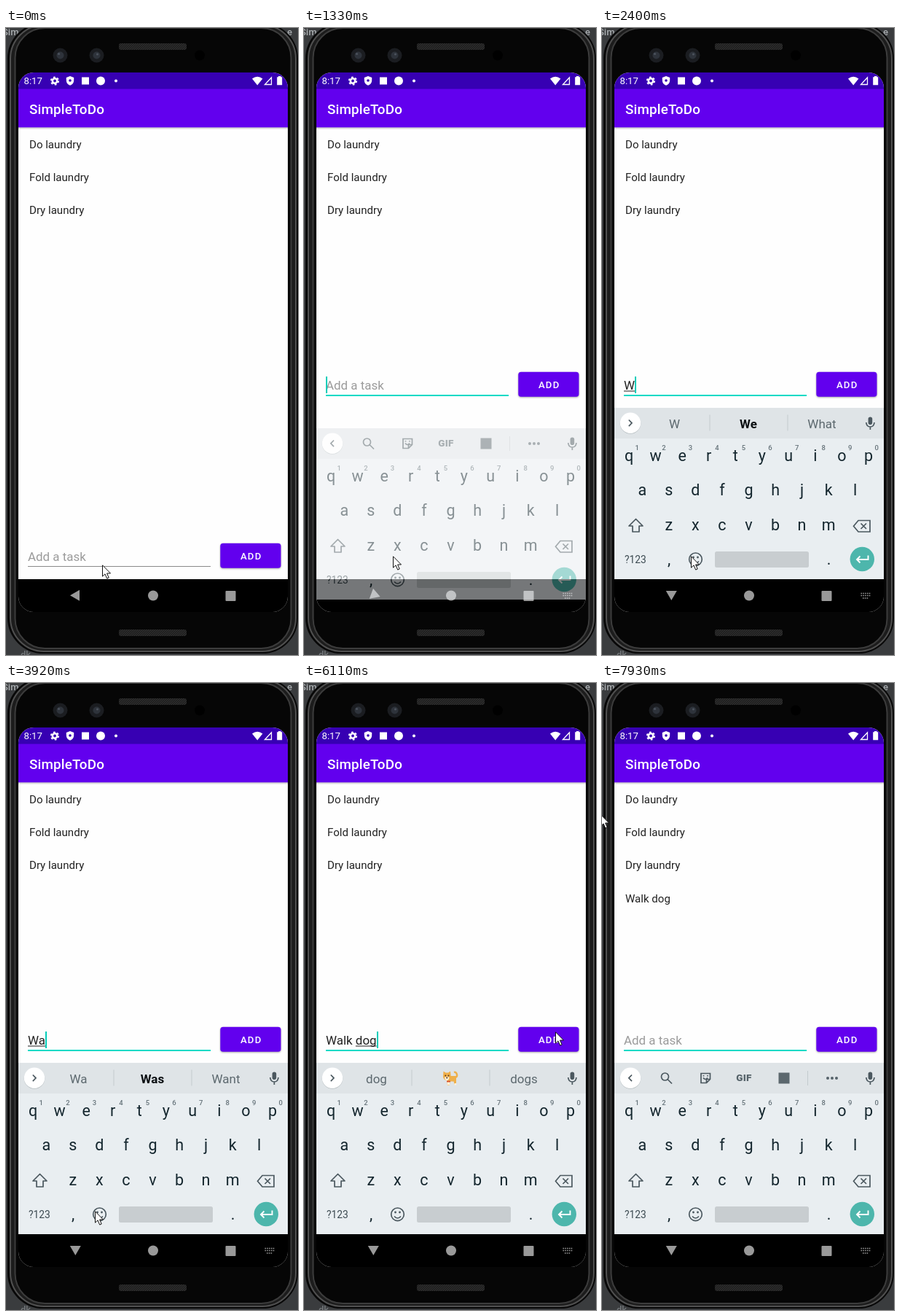
An HTML page for the animation above (8000 ms loop, 401 px wide and 860 px high).

```html
<!DOCTYPE html>
<html lang="en">
<head>
<meta charset="utf-8">
<title>To-do app demo</title>
<style>
html, body { margin: 0; width: 100%; height: 100%; overflow: hidden; background: #3a3c3e; }
svg { display: block; font-family: Roboto, "Open Sans", sans-serif; }
text { white-space: pre; }
.mid { text-anchor: middle; }
.item { font-size: 15.07px; fill: #212121; }
.field { font-size: 16.96px; }
.key { font-size: 21.5px; fill: #14262e; }
.num { font-size: 9.5px; font-weight: 500; fill: #66737a; }
.sug { font-size: 17px; fill: #5c686e; }
.best { font-weight: 700; fill: #0b0f12; }
.line { fill: none; stroke: #4b585f; stroke-width: 1.7; }
#btn { filter: drop-shadow(0 1px 1px rgba(0, 0, 0, .35)); }
</style>
</head>
<body>
<svg width="401" height="860" viewBox="0 0 401 860">
  <defs>
    <pattern id="mesh" width="3" height="3" patternUnits="userSpaceOnUse">
      <rect width="3" height="3" fill="#2c2c2c"/><path d="M0 3L3 0" stroke="#181818"/>
    </pattern>
    <linearGradient id="shade" x2="0" y2="1">
      <stop stop-color="#000" stop-opacity=".25"/><stop offset="1" stop-color="#000" stop-opacity="0"/>
    </linearGradient>
    <clipPath id="screen"><rect x="17" y="61" width="370" height="740" rx="21"/></clipPath>
  </defs>

  <!-- desktop and phone body -->
  <rect width="401" height="860" fill="#3a3c3e"/>
  <g font-size="13" font-weight="500" fill="#a9adb0">
    <text x="-5" y="10">Sim</text><text x="386" y="10">e</text>
    <text x="20" y="864" fill="#73777a">dk.</text>
  </g>
  <rect x="3" y="-6" width="397" height="863" rx="48" fill="#0b0b0b" stroke="#080808" stroke-width="2"/>
  <rect x="6" y="-4" width="392" height="859" rx="46" fill="#1c1c1c" stroke="#505050" stroke-width="2"/>
  <rect x="12.5" y="0" width="379" height="851" rx="41" fill="#060606" stroke="#3c3c3c" stroke-width="2"/>
  <g fill="url(#mesh)">
    <rect x="155" y="21" width="93" height="9" rx="3"/><rect x="155" y="825" width="93" height="9" rx="3"/>
  </g>
  <g fill="#1b1d21">
    <circle cx="74.5" cy="37.5" r="10"/><circle cx="124.5" cy="37.5" r="10"/>
    <g fill="#2e333b">
      <circle cx="74.5" cy="37.5" r="5"/><circle cx="124.5" cy="37.5" r="5"/>
      <g fill="#4b525c"><circle cx="72.5" cy="35.5" r="1.6"/><circle cx="125.5" cy="36" r="1.6"/></g>
    </g>
  </g>
  <circle cx="266" cy="37.5" r="7" fill="#000"/>

  <g clip-path="url(#screen)">
    <rect x="17" y="61" width="370" height="740" fill="#fefefe"/>
    <rect x="17" y="136" width="370" height="3.5" fill="url(#shade)"/>
    <rect x="17" y="83" width="370" height="53.3" fill="#6200ee"/>
    <rect x="17" y="61" width="370" height="22.6" fill="#3700b3"/>
    <text x="32" y="117.5" font-size="18.84" font-weight="500" letter-spacing=".17" fill="#fff">SimpleToDo</text>

    <!-- status bar -->
    <g fill="#fff">
      <text x="24.5" y="77" font-size="13.2">8:17</text>
      <circle cx="67" cy="72.5" r="3.2" fill="none" stroke="#fff" stroke-width="2.6"/>
      <circle cx="67" cy="72.5" r="5.2" fill="none" stroke="#fff" stroke-width="1.8" stroke-dasharray="2.7 2.745"/>
      <path d="M88 66l5.2 2v4c0 3.2-2.2 5.6-5.2 6.8c-3-1.2-5.2-3.6-5.2-6.8v-4z"/>
      <circle cx="88" cy="72" r="1.8" fill="#3700b3"/>
      <rect x="104" y="67.5" width="10" height="10"/>
      <circle cx="130" cy="72.5" r="6"/>
      <circle cx="151" cy="72.5" r="2"/>
      <path d="M338 69.5q7.2-5.4 14.4 0l-7.2 9z"/>
      <path d="M355.5 77.5h9v-9.5z" fill="none" stroke="#fff" stroke-width="1.3"/>
      <path d="M374 66h3.5v1.3h1.7v11h-7v-11h1.8z"/>
    </g>

    <g class="item" id="list"></g>

    <!-- entry row -->
    <g id="row">
      <text class="field" id="hint" x="30" y="496" fill="#9b9b9b">Add a task</text>
      <text class="field" id="typed" x="30" y="496" fill="#212121"></text>
      <rect id="under" y="497.5" height="1" fill="#212121"/>
      <rect x="30" y="503" width="251" height="1" fill="#8a8a8a"/>
      <rect id="focus" x="30" y="503" width="251" height="2" fill="#03dac5"/>
      <rect id="caret" y="478" width="2" height="23" fill="#03cdb9"/>
      <rect id="btn" x="294.3" y="471.8" width="83.2" height="34" rx="3.8" fill="#6200ee"/>
      <text class="mid" x="336.7" y="494" font-size="13.2" font-weight="500" letter-spacing="1.18" fill="#fff">ADD</text>
    </g>

    <!-- navigation bar -->
    <rect x="17" y="756" width="370" height="45"/>
    <g fill="#999">
      <path id="back" d="M88 778.3l13-7.5v15z"/>
      <circle cx="202" cy="778.5" r="7"/><rect x="301.5" y="772" width="14" height="14" rx="1"/>
      <path id="kbIcon" d="M355.5 775.5h13M355.5 778.5h13M358 782h8" stroke="#999" stroke-width="1.5" stroke-dasharray="1.6 1.2"/>
    </g>

    <!-- keyboard -->
    <g id="board">
      <rect x="17" y="521" width="370" height="235" fill="#e9eef1"/>
      <rect x="17" y="521" width="370" height="42" fill="#dfe4e7"/>
      <circle cx="39" cy="542.5" r="14.3" fill="#b9c0c4"/><circle cx="39" cy="541.8" r="14.2" fill="#fff"/>
      <path id="chev" class="line" d="M41 537.5l-4.2 4.3l4.2 4.3"/>
      <g id="tools">
        <circle class="line" cx="86.5" cy="540" r="5"/><path class="line" d="M90 543.5l6 6" stroke-width="2.2"/>
        <path class="line" d="M136 535.5h12.5v8l-5 5h-7.5zM148.5 543.5h-5v5M139 541.5q3 4 6 0"/>
        <path class="line" d="M139.5 538v1.5M145 538v1.5"/>
        <text class="mid" x="195" y="546.3" font-size="13.5" font-weight="900" letter-spacing=".3" fill="#56636a">GIF</text>
        <rect x="242.5" y="534.5" width="15" height="15" fill="#5c686e"/>
        <rect x="282" y="532" width="1" height="20" fill="#c3cacd"/>
        <g fill="#56636a"><circle cx="310" cy="542" r="2"/><circle cx="316" cy="542" r="2"/><circle cx="322" cy="542" r="2"/></g>
      </g>
      <g id="sugs">
        <path d="M148 530.5v22M255 530.5v22" stroke="#c3cacd"/>
        <text class="sug mid" x="99.5" y="548.5"></text>
        <text class="sug best mid" x="201" y="548.5"></text>
        <text class="sug mid" x="302" y="548.5"></text>
        <g id="dog">
          <path d="M206 541q5 0 4-4t-4-3" fill="none" stroke="#eeb04c" stroke-width="2.6"/>
          <path d="M196 539h13v11.5h-2.6l-.8-4h-5l-.8 5.5h-2.8z" fill="#eeb04c"/>
          <path d="M191.5 532.5l3 2h3.5l3-2 .8 8q-1 4.5-5.2 4.5t-5.6-4.5z" fill="#efae48"/>
          <path d="M193 541q3.2-2 6.5 0q-.5 4-3.2 4t-3.3-4M197 551.5h3v-4h-3M206.5 549h2.6v2.5h-2.6" fill="#fff1da"/>
          <g fill="#4a2f1d"><circle cx="194.3" cy="538.5" r=".9"/><circle cx="198.5" cy="538.5" r=".9"/><circle cx="196.3" cy="541.5" r="1.1"/></g>
          <path d="M196 546.5h5" stroke="#d8452f" stroke-width="1.5"/>
        </g>
      </g>
      <rect x="365.6" y="533.5" width="5.6" height="10.5" rx="2.8" fill="#4b585f"/>
      <path class="line" d="M362.8 541q.5 6 5.6 6t5.6-6M368.4 547v4"/>
      <g id="keys"></g>
      <path class="line" d="M46.5 673.5l9.5 9.5h-5v8h-9v-8h-5z" stroke-linejoin="round"/>
      <path class="line" d="M352 675.5h16v15.500h-16l-6.500-7.750zM355.500 679.500l7.500 7.500M363 679.500l-7.500 7.500"/>
      <text class="mid" x="46" y="734" font-size="13.8" fill="#3c4a51">?123</text>
      <circle class="line" cx="128.5" cy="728.8" r="8.8"/>
      <path class="line" d="M124 731.5q4.5 5 9 0"/>
      <g fill="#4b585f"><circle cx="125.5" cy="726" r="1.4"/><circle cx="131.5" cy="726" r="1.4"/></g>
      <rect x="155" y="718" width="129" height="22" rx="2.5" fill="#c8cdd0"/>
      <circle cx="357.3" cy="728.5" r="16.7" fill="#4db6ac"/>
      <path d="M365.5 723.5v5.5h-15M354.5 724.5l-4.5 4.5l4.5 4.5" fill="none" stroke="#fff" stroke-width="1.9"/>
    </g>
  </g>

  <path id="mouse" d="M.5 .8v15.400l3.500-3.300l2.700 6.200l2.500-1.100l-2.600-6h4.900z" fill="#fff" stroke="#111" stroke-width="1"/>
</svg>

<script>
const LOOP = 8000;
const $ = id => document.getElementById(id);

function addText(parent, text, x, y, cls) {
  const el = document.createElementNS("http://www.w3.org/2000/svg", "text");
  el.textContent = text;
  el.setAttribute("x", x);
  el.setAttribute("y", y);
  if (cls) el.setAttribute("class", cls);
  return parent.appendChild(el);
}

const items = ["Do laundry", "Fold laundry", "Dry laundry", "Walk dog"]
  .map((s, i) => addText($("list"), s, 32, 165 + 45.2 * i));

[["qwertyuiop", 37, 593.5], ["asdfghjkl", 55.3, 641], ["zxcvbnm", 91.8, 688.5]].forEach(([row, x, y]) =>
  [...row].forEach((c, i) => addText($("keys"), c, x + 36.55 * i, y, "key mid")));
[..."1234567890"].forEach((c, i) => addText($("keys"), c, 48.3 + 36.55 * i, 579, "num mid"));
addText($("keys"), ",", 92, 736, "key mid");
addText($("keys"), ".", 311.5, 736, "key mid");

// Each track is a list of [start time, value...], held until the next entry.
const mouse = [
  [0, 132, 736], [120, 126, 719], [240, 122, 704], [390, 124, 701], [510, 123, 706], [630, 122, 715],
  [750, 122, 724], [5710, 158, 575], [5840, 195, 427], [5990, 270, 445], [6110, 345, 478],
  [7210, 347, 470], [7360, 267, 160], [7510, 54, 51], [7660, -40, 110], [7930, -2, 180]
];
const typing = [
  [0, ""], [2400, "W", "W", "We", "What"], [3920, "Wa", "Wa", "Was", "Want"],
  [4170, "Wal", "Wal", "Walk", "Wall"], [4420, "Walk ", "to", "in", "the"],
  [4850, "Walk d", "d", "down", "day"], [4970, "Walk do", "do", "down", "dog"],
  [5120, "Walk dog", "dog", "", "dogs"], [6540, ""]
];
const caret = [
  [0, 0], [1060, 1], [1720, 0], [2120, 1], [2990, 0], [3490, 1], [5710, 0],
  [6110, 1], [6940, 0], [7510, 1], [7930, 0]
];
const focus = [[0, 0], [1060, .5], [1180, 1]];
// keyboard: offset, opacity, back arrow angle
const board = [[0, 0, 0, 0], [1330, 28, .5, -40], [1450, 6, .88, -82], [1600, 1, .98, -88], [1720, 0, 1, -90]];
const button = [[0, "#6200ee"], [6410, "#8133f1"], [6540, "#7118ef"], [6690, "#6200ee"]];
const tools = [[0, 1], [2400, 0], [6540, .5], [6690, 1]];

const at = (track, t) => track.findLast(step => step[0] <= t).slice(1);
const set = (id, name, value) => $(id).setAttribute(name, value);
const sugText = $("sugs").querySelectorAll("text");

function draw(t) {
  const [mx, my] = at(mouse, t);
  set("mouse", "transform", `translate(${mx} ${my})`);

  const [dy, alpha, turn] = at(board, t);
  set("board", "transform", `translate(0 ${dy})`);
  set("board", "opacity", alpha);
  set("back", "transform", `rotate(${turn} 95 778)`);
  set("kbIcon", "opacity", alpha ? 1 : 0);
  set("row", "transform", `translate(0 ${alpha ? 0 : 235})`);

  const [text, ...words] = at(typing, t);
  const el = $("typed");
  el.textContent = text;
  const width = n => n ? el.getSubStringLength(0, n) : 0;
  const end = width(text.length), start = width(text.lastIndexOf(" ") + 1);
  set("hint", "opacity", text ? 0 : 1);
  set("under", "x", 30 + start);
  set("under", "width", Math.max(0, end - start));
  set("caret", "x", Math.round(30 + end));
  set("caret", "opacity", at(caret, t)[0]);
  set("focus", "opacity", at(focus, t)[0]);
  set("btn", "fill", at(button, t)[0]);

  const [shown] = at(tools, t);
  set("tools", "opacity", shown);
  set("sugs", "opacity", text ? 1 : 0);
  set("chev", "transform", text ? "rotate(180 38.9 541.8)" : "");
  sugText.forEach((s, i) => s.textContent = words[i] || "");
  set("dog", "opacity", text === "Walk dog" ? 1 : 0);
  items[3].setAttribute("opacity", t >= 6690 ? 1 : 0);
}

const origin = performance.now();
function tick() {
  draw((performance.now() - origin) % LOOP);
  requestAnimationFrame(tick);
}
tick();
</script>
</body>
</html>
```
